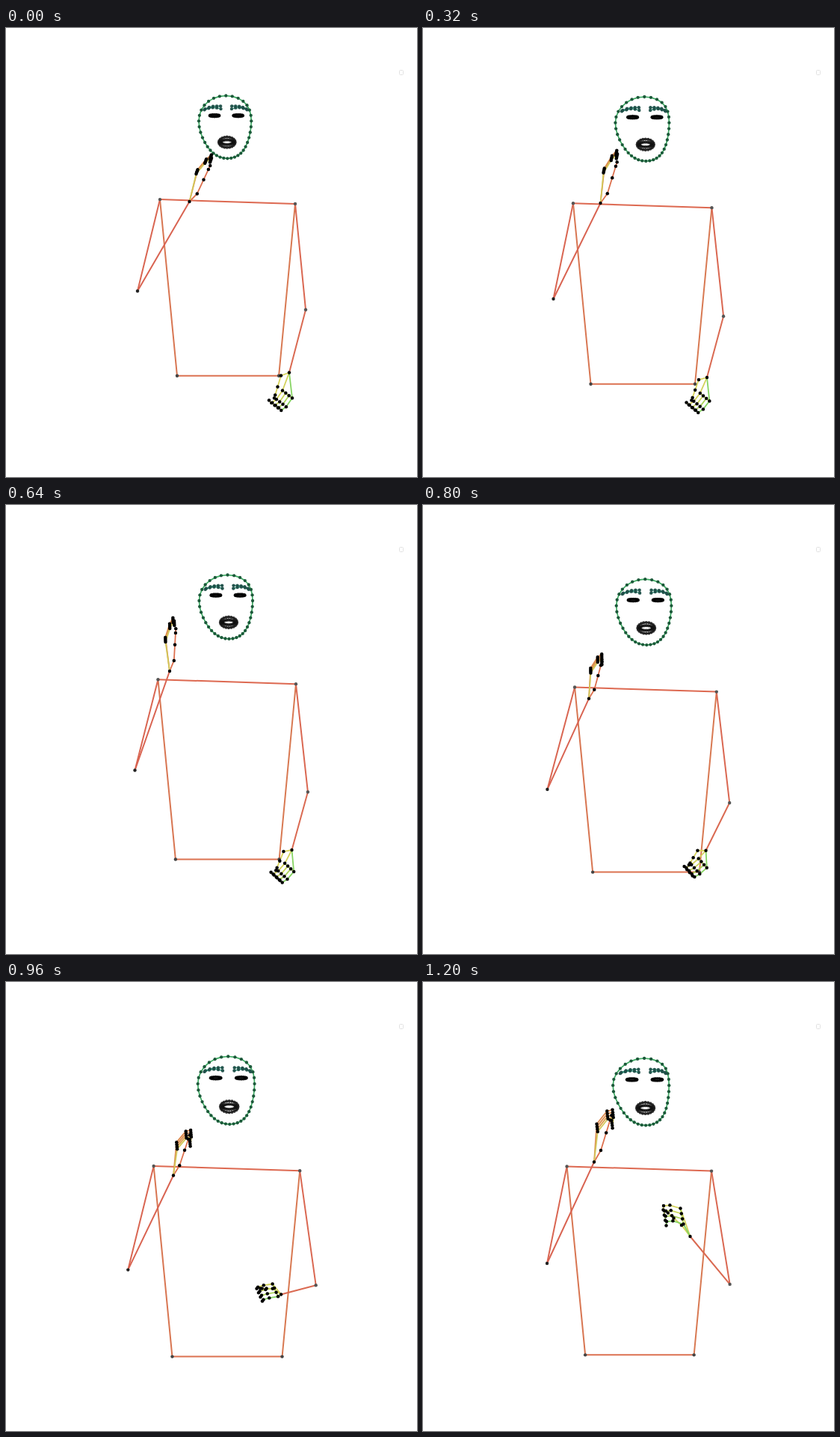
Write an HTML page that moves like this. It is 550 by 600 pixels and loops after 1.28 s.

```html
<!DOCTYPE html>
<html lang="en">
<head>
<meta charset="utf-8">
<title>Body pose</title>
<style>
  html, body { margin: 0; width: 100%; height: 100%; overflow: hidden; background: #fff; }
  svg { display: block; width: 550px; height: 600px; }
  path { fill: none; stroke-linecap: round; stroke-linejoin: round; }
</style>
</head>
<body>
<svg id="stage" viewBox="0 0 550 600"></svg>
<script>
const STEP = 80, LOOP = 1280;
const stage = document.getElementById('stage');

// Everything else in the figure follows from these few tracks
const times = [0, 160, 320, 640, 880, 1040, 1200];
const tracks = {
  centre: [296.5, 294.5, 293.7, 295.7, 298.5, 291.5, 289.3],
  chest: [232, 231.2, 237.2, 236.2, 250.2, 248, 249.5],
  width: [181, 184, 185.5, 184.5, 193, 197, 193.5],
  headTop: [90.5, 88, 92, 93.5, 101, 98, 102],
  turn: [1, 2, 2.6, 2, 1.4, 3.5, 4],
  elbowX: [176, 175.5, 174.5, 172.5, 164, 163, 166],
  elbowY: [351.5, 354.5, 362, 354.5, 389, 379, 376],
  wristX: [245.5, 238.5, 237.5, 219, 223.5, 224.5, 229],
  wristY: [232, 229.5, 234, 222, 271.5, 244, 240.5],
  farX: [379, 379.5, 380, 382.5, 375, 361.5, 357.5],
  farY: [460.5, 461, 467, 461, 462, 363.5, 340],
  raise: [-.1, 0, .05, .1, .32, .9, 1]
};

// Hand shapes as vectors from the wrist
const openHand = { palm: [3, -42], spread: [-1, 6], reach: [16, -19], bend: [1.5, -8], thumb: [8.5, -12.5], thumbReach: [11, -41] };
const bentHand = { palm: [4, -40], spread: [1, 9], reach: [17.5, -4], bend: [4, -15], thumb: [8, -13.5], thumbReach: [13, -41] };
const hangingHand = { palm: [-2.5, 29], spread: [13, 10], reach: [-18, 13], bend: [1, 6], thumb: [-11, 4], thumbReach: [-9, 30] };
const raisedHand = { palm: [-11, -27], spread: [4, 21], reach: [-23, 2], bend: [-3, -6], thumb: [-11.5, -15], thumbReach: [-21, -19] };

const add = (p, q, k = 1) => [p[0] + q[0] * k, p[1] + q[1] * k];
const mix = (p, q, k) => p.map((x, i) => x + (q[i] - x) * k);

// Smooth curve through the keys that never overshoots them
function slope(values, i) {
  if (i === 0 || i === times.length - 1) return 0;
  const m = (values[i] - values[i - 1]) / (times[i] - times[i - 1]);
  const n = (values[i + 1] - values[i]) / (times[i + 1] - times[i]);
  return m * n > 0 ? 2 * m * n / (m + n) : 0;
}
function sample(values, time) {
  let i = 0;
  while (i < times.length - 2 && times[i + 1] <= time) i++;
  const span = times[i + 1] - times[i], s = (time - times[i]) / span;
  return values[i] + (values[i + 1] - values[i]) * s * s * (3 - 2 * s) +
    span * s * (1 - s) * ((1 - s) * slope(values, i) - s * slope(values, i + 1));
}

function make(tag, attrs) {
  const el = document.createElementNS('http://www.w3.org/2000/svg', tag);
  for (const k in attrs) el.setAttribute(k, attrs[k]);
  return stage.appendChild(el);
}
const line = (stroke, width = 2) => make('path', { stroke, 'stroke-width': width });
const dots = (n, fill, r = 2.2, opacity = 1) =>
  Array.from({ length: n }, () => make('circle', { r, fill, 'fill-opacity': opacity }));

function setLine(el, pts, closed) {
  el.setAttribute('d', 'M' + pts.map(p => p[0].toFixed(2) + ' ' + p[1].toFixed(2)).join('L') + (closed ? 'Z' : ''));
}
function setDots(els, pts) {
  els.forEach((el, i) => {
    el.setAttribute('cx', pts[i][0].toFixed(2));
    el.setAttribute('cy', pts[i][1].toFixed(2));
  });
}

// Face shapes: u runs -1..1 across, v runs 0..1 down
const outline = Array.from({ length: 36 }, (_, i) => {
  const a = i / 18 * Math.PI, c = Math.cos(a), s = Math.sin(a);
  return [s * (.965 + .3 * c + .16 * c * c), .5 - c / 2 + .085 * s * s];
});
function brow(side, lower) {
  return Array.from({ length: 5 }, (_, i) => {
    const s = i / 4;
    return lower
      ? [side * (.21 + .62 * s), .21 - .03 * Math.sin(Math.PI * s) + .015 * s]
      : [side * (.22 + .58 * s), .165 + .045 * s ** 3];
  });
}
const brows = [-1, 1].flatMap(side => [brow(side, false), brow(side, true)]);

const ring = (n, [x, y], rx, ry) => Array.from({ length: n }, (_, i) => {
  const a = i / n * Math.PI * 2;
  return [x + rx * Math.cos(a), y + ry * Math.sin(a)];
});

// Joints: shoulder, elbow, wrist, hip of one side, then of the other
const bones = [[0, 4, '#dd6951'], [3, 7, '#dc7251'], [0, 3, '#d87652'], [4, 7, '#d87952'],
  [0, 1, '#d96652'], [1, 2, '#d96452'], [4, 5, '#da6852'], [5, 6, '#da6a52']];
const boneLines = bones.map(b => line(b[2]));

const makeHand = (colors, palm) =>
  ({ fingers: colors.map(c => line(c, 1.8)), palm: line(palm, 1.8), edge: line(colors[4], 1.8) });
const handA = makeHand(['#dd704e', '#dd8a4e', '#dd8f50', '#dda052', '#d3c85a'], '#dca852');
const handB = makeHand(['#d8d45a', '#d3d25a', '#c8d55a', '#acd55a', '#86d462'], '#b8d65a');

const faceLine = line('#3dab62', 1.7);
const browLines = brows.map(() => line('#38a287', 1.5));
const eyeLines = [0, 1].map(() => line('#222', 2));
const lipLines = [0, 1].map(() => line('#333', 1));
const faceDots = dots(36, '#1c593a', 2.15);
const browDots = brows.map(() => dots(5, '#1f4f48', 2.2, .95));
const eyeDots = [0, 1].map(() => dots(16, '#000', 1.9, .85));
const lipDots = [0, 1].map(() => dots(20, '#111', 2.1, .85));
const bodyDots = ['#555', '#222', '#000', '#444', '#555', '#555', '#000', '#444'].flatMap(c => dots(1, c));
for (const hand of [handA, handB]) hand.dots = dots(20, '#000', 2.25);

make('rect', { x: 526.5, y: 56.5, width: 5, height: 6, rx: 1, fill: 'none', stroke: '#e2e2e2' });

function drawFace(p) {
  const w = p.width * .38, h = p.width * .463;
  const middle = p.centre + 2 * p.turn - 5.2;
  const put = ([u, v]) => [middle + w / 2 * u + (p.turn + 2 * v) * (1 - u ** 4), p.headTop + h * v];
  const oval = outline.map(put);
  setLine(faceLine, oval, true);
  setDots(faceDots, oval);
  brows.forEach((b, i) => {
    const pts = b.map(put);
    setLine(browLines[i], pts);
    setDots(browDots[i], pts);
  });
  [-.46, .46].forEach((u, i) => {
    const eye = ring(16, put([u, .317]), w * .095, h * .017);
    setLine(eyeLines[i], eye, true);
    setDots(eyeDots[i], eye);
  });
  const mouth = put([0, .742]);
  [[.158, .084], [.12, .037]].forEach(([rx, ry], i) => {
    const lip = ring(20, mouth, w * rx, h * ry);
    setLine(lipLines[i], lip, true);
    setDots(lipDots[i], lip);
  });
}

// Four joints that sweep along reach and bulge along bend
function chain(start, reach, bend) {
  return [0, 1, 2, 3].map(k =>
    add(add(start, reach, Math.sin(k * Math.PI / 6)), bend, Math.sin(k * Math.PI / 3)));
}

function drawHand(hand, wrist, from, to, blend, angle = 0, size = 1) {
  const shape = {}, c = Math.cos(angle) * size, s = Math.sin(angle) * size;
  for (const k in from) {
    const [x, y] = mix(from[k], to[k], blend);
    shape[k] = [x * c - y * s, x * s + y * c];
  }
  const fingers = [chain(add(wrist, shape.thumb), shape.thumbReach, [0, 0])];
  for (let i = 0; i < 4; i++) {
    const knuckle = add(add(wrist, shape.palm), shape.spread, i / 3 - .5);
    fingers.push(chain(knuckle, shape.reach, shape.bend));
  }
  hand.fingers.forEach((el, i) => setLine(el, i < 2 ? [wrist, ...fingers[i]] : fingers[i]));
  setLine(hand.palm, fingers.slice(1).map(f => f[0]));
  setLine(hand.edge, [wrist, fingers[4][0]]);
  setDots(hand.dots, fingers.flat());
}

function joints(p) {
  const w = p.width, tilt = w * .016;
  const near = [p.centre - w / 2, p.chest - tilt];
  const far = [p.centre + w / 2, p.chest + tilt];
  const hip = add(near, [.127, 1.302], w);
  return [
    near, [p.elbowX, p.elbowY], [p.wristX, p.wristY], hip,
    far, add(far, [.082 + .045 * p.raise, .782], w), [p.farX, p.farY], add(hip, [.752, 0], w)
  ];
}

function draw(time) {
  const p = {};
  for (const k in tracks) p[k] = sample(tracks[k], time);
  const body = joints(p);
  bones.forEach(([a, b], i) => setLine(boneLines[i], [body[a], body[b]]));
  setDots(bodyDots, body);
  drawFace(p);

  // The near hand turns twice as far as its forearm and shrinks as it tips away
  const [dx, dy] = add(body[2], body[1], -1);
  const angle = 2 * (Math.atan2(dx, -dy) - .44);
  const size = (Math.hypot(dx, dy) / 140) ** 2;
  const curl = Math.min(1, Math.max(0, 4 * p.raise - .4));
  drawHand(handA, body[2], openHand, bentHand, curl, angle, size);
  drawHand(handB, body[6], hangingHand, raisedHand, Math.max(0, p.raise));
}

function tick() {
  draw(Math.floor(performance.now() % LOOP / STEP) * STEP);
  requestAnimationFrame(tick);
}
tick();
</script>
</body>
</html>
```
